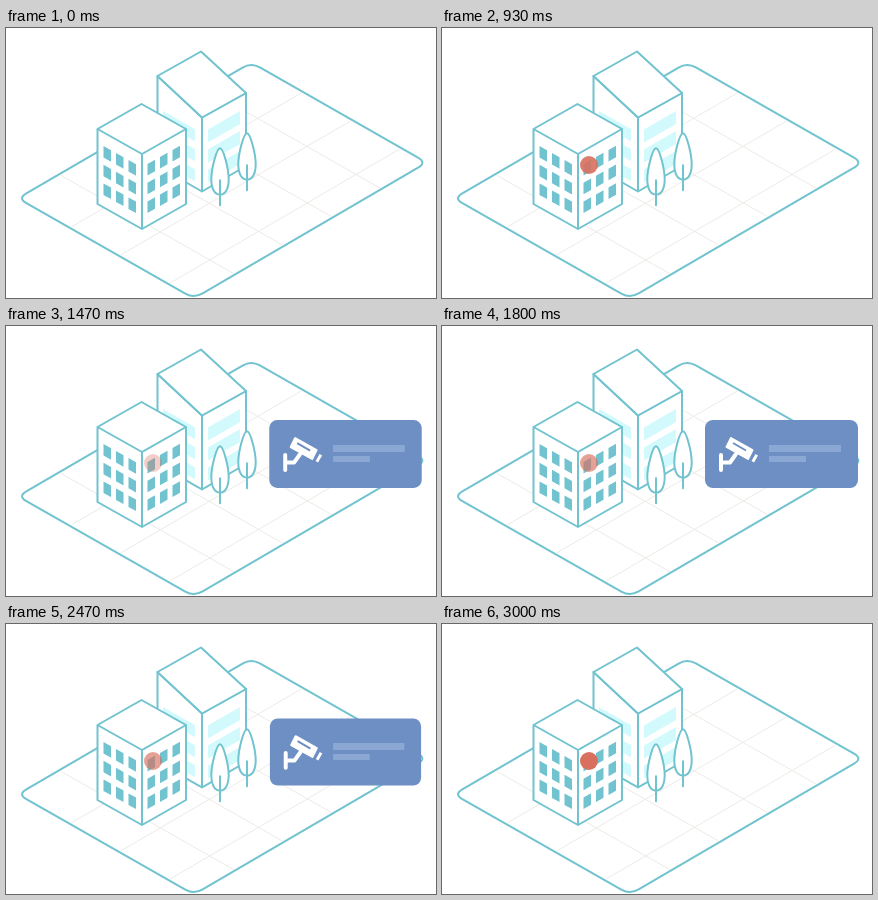
An HTML page for the animation above (3070 ms loop, 430 by 270 pixels).

```html
<!DOCTYPE html>
<html lang="en">
<head>
<meta charset="utf-8">
<title>Building camera alert</title>
<style>
  html, body { margin: 0; width: 100%; height: 100%; overflow: hidden; background: #fff; }
  svg { display: block; width: 430px; height: 270px; }
  .line { fill: #fff; stroke: #70c3cf; stroke-width: 2; stroke-linejoin: round; stroke-linecap: round; }
  .open { fill: none; }
  #grid { stroke: #edebe7; stroke-width: 1; fill: none; }
  #bands { fill: #d2f9fc; }
  #panes { fill: #70c3cf; }
</style>
</head>
<body>
<svg viewBox="0 0 430 270">
  <path id="ground" class="line"/>
  <path id="grid"/>

  <path class="line" d="M151.5 48L196 89.5V163.5L151.5 138Z M196 89.5L240 65V138L196 163.5Z"/>
  <path id="bands"/>
  <path class="line" d="M195 23.5L240 65L196 89.5L151.5 48Z"/>

  <path class="line" d="M91.5 101L136 126V201L91.5 176Z M136 126L180 101V176L136 201Z M135.5 76L180 101L136 126L91.5 101Z"/>
  <path id="panes"/>

  <defs>
    <g id="tree">
      <path class="line" d="M0 0C3.5 0 8.7 21 8.7 31C8.7 41 5 46.3 0 46.3C-5 46.3 -8.7 41 -8.7 31C-8.7 21 -3.5 0 0 0Z"/>
      <path class="line open" d="M0 32V57"/>
    </g>
  </defs>
  <use href="#tree" x="241" y="105.3"/>
  <use href="#tree" x="214" y="120.3"/>

  <circle id="dot" cx="147" cy="137" r="9" fill="#d9705f"/>

  <g id="card">
    <rect x="-76.5" y="-34" width="153" height="68" rx="8" fill="#6d8fc4"/>
    <path fill="#8ba7d3" d="M-12.5 -9h72v7h-72z M-12.5 2h37v6h-37z"/>
    <g transform="translate(-339.5 -128)">
      <path d="M279 129V144M280 136.5H288L294 128" fill="none" stroke="#fff" stroke-width="4" stroke-linecap="round" stroke-linejoin="round"/>
      <path d="M289 112L310.5 124L306 133L284.5 121Z" fill="#fff" stroke="#fff" stroke-width="2" stroke-linejoin="round"/>
      <path d="M291 117L304 124.5" stroke="#6d8fc4" stroke-width="2"/>
      <path d="M313.5 128L316 129.5L312 136.5L309.5 135Z" fill="#fff"/>
    </g>
  </g>
</svg>
<script>
const LOOP = 3070, STEP = 200 / 3, PULSE = 2000 / 3;
const byId = id => document.getElementById(id);
const setPath = (id, d) => byId(id).setAttribute('d', d);
const mix = (a, b, k) => [a[0] + (b[0] - a[0]) * k, a[1] + (b[1] - a[1]) * k];

// Ground: a rhombus whose corners are cut 10 px along each edge.
const left = [11.7, 170.3], top_ = [245.2, 34.5], right = [420.7, 134.6], bottom = [188, 270.5];
const corners = [left, top_, right, bottom];
const toward = (a, b) => mix(a, b, 10 / Math.hypot(b[0] - a[0], b[1] - a[1]));
setPath('ground', corners.map((c, i) => {
  const before = toward(c, corners[(i + 3) % 4]), after = toward(c, corners[(i + 1) % 4]);
  return `${i ? 'L' : 'M'}${before}Q${c} ${after}`;
}).join('') + 'Z');

const segment = (a, b) => `M${mix(a, b, 0.008)}L${mix(a, b, 0.992)}`;
setPath('grid',
  [0.295, 0.575, 0.855].map(k => segment(mix(left, bottom, k), mix(top_, right, k))).join('') +
  [0.177, 0.387, 0.597, 0.806].map(k => segment(mix(left, top_, k), mix(bottom, right, k))).join(''));

// Upright-sided parallelogram lying on an isometric wall.
const wallRect = (x, y, w, h, slope) => `M${x} ${y}l${w} ${w * slope}v${h}l${-w} ${-w * slope}z`;
let bands = '', panes = '';
for (let row = 0; row < 3; row++) {
  bands += wallRect(157, 83 + 20 * row, 32, 12, 0.57) + wallRect(202, 101.5 + 20 * row, 32, 13, -0.58);
  for (let col = 0; col < 3; col++) {
    panes += wallRect(97.5 + 12.5 * col, 118 + 7 * col + 18.7 * row, 7.5, 11.5, 0.56);
    panes += wallRect(141.5 + 12.5 * col, 136 - 7 * col + 18.7 * row, 7.5, 11.5, -0.56);
  }
}
setPath('bands', bands);
setPath('panes', panes);

const clamp = v => Math.min(1, Math.max(0, v));

function dotOpacity(t) {
  const phase = t % PULSE;
  return phase < 100 ? 0 : (1 - Math.cos(2 * Math.PI * phase / PULSE)) / 2;
}

function cardScale(t) {
  const grow = 1 - (1 - clamp((t - 1212) / 300)) ** 3;
  const shrink = clamp((t - 2399) / 297) ** 3;
  return grow - shrink;
}

function draw(time) {
  // The motion runs at 15 steps a second.
  const t = Math.floor((time % LOOP + 3.4) / STEP) % 46 * STEP;
  const scale = cardScale(t);
  byId('dot').setAttribute('opacity', dotOpacity(t));
  byId('card').setAttribute('visibility', scale > 0.001 ? 'visible' : 'hidden');
  byId('card').setAttribute('transform', `translate(339.5 128) scale(${scale})`);
}

const start = performance.now();
function tick() {
  draw(performance.now() - start);
  requestAnimationFrame(tick);
}
tick();
</script>
</body>
</html>
```
